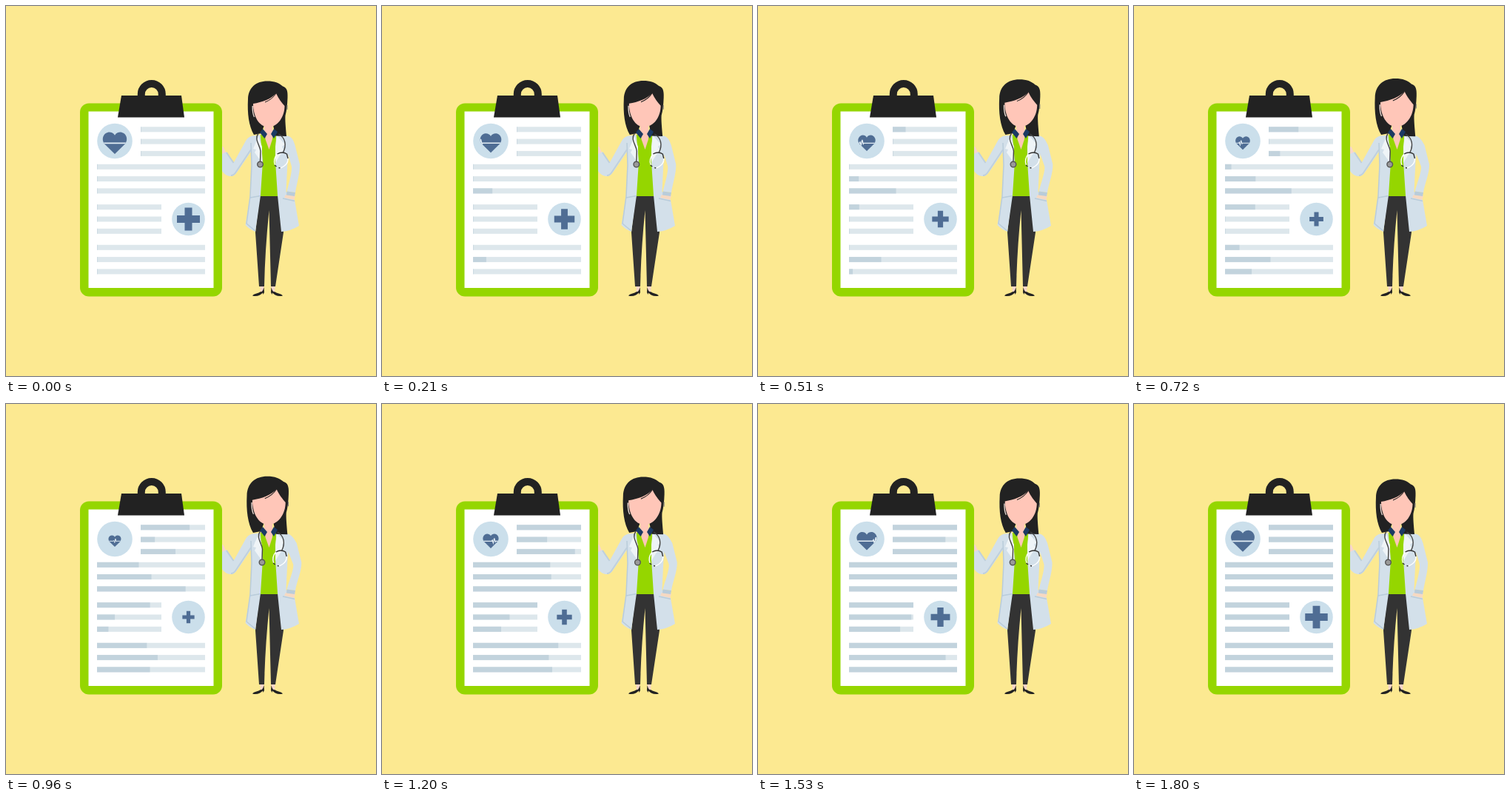
Animation of 500x500 px, one loop 1.83 s. Source, as an HTML page:

```html
<!DOCTYPE html>
<html lang="en">
<head>
<meta charset="utf-8">
<title>Medical checklist</title>
<style>
html, body { margin: 0; width: 100%; height: 100%; overflow: hidden; background: #fce991; }
svg { display: block; width: 100vw; height: 100vh; }
</style>
</head>
<body>
<svg viewBox="0 0 500 500">
  <defs>
    <path id="heartShape" d="M0-10.6C-2.6-15.4-8.6-15.9-12.2-13.3C-16.8-10-17.6-3.6-13.8 1.2L0 14.7L13.8 1.2C17.6-3.6 16.8-10 12.2-13.3C8.6-15.9 2.6-15.4 0-10.6Z"/>
    <clipPath id="heartClip"><use href="#heartShape"/></clipPath>
    <path id="shoe" d="M333 391.5C336 388 341 388.5 344 386C346 387 347.5 384 348.5 380L349 387L347.5 390L347 387.5C344 391 339 393 333 391.5Z"/>
  </defs>

  <!-- legs -->
  <path fill="#f7d5c9" d="M343.5 378H348.5L348 388H344ZM358.5 378H363.5L363 388H359Z"/>
  <g fill="#222">
    <use href="#shoe"/>
    <use href="#shoe" transform="translate(707 0) scale(-1 1)"/>
  </g>
  <path fill="#333" d="M343 254H368L375 306L364 379H358L355.5 276Q350 330 349 379H342L337 306Z"/>

  <!-- raised arm -->
  <path fill="#f8d5ce" d="M290 188L294 191L297.5 199L290 202Z"/>
  <path fill="#d3e0ea" d="M338 175C330 175 326 178 323 184L307.5 212L298 197L290 201V220C295 228 299 230 304 230C309 230 311 226 314 222L333 194Z"/>
  <path fill="none" stroke="#bfd0dd" stroke-width="2" d="M331 194L311 224Q308 229 304 229M298 198L307.5 212"/>

  <!-- torso -->
  <path fill="#95d600" d="M344 174H367L368 257H344Z"/>
  <path id="sleeve" fill="#d3e0ea"/>
  <path fill="#d3e0ea" d="M343 174L334 176L330 183L332 215L330 257L323.5 296Q329 302 337 305L344 256L347 210L344 178ZM365 175L378 175L384 181L380.5 210L378.500 251L390 262L396 297Q385 304 372 305L367 256L364 210Z"/>
  <path fill="#f6d9c2" d="M378 255L391 256L389.500 262L376 259Z"/>
  <path fill="#b9ccda" d="M379.5 250.5L391 252L390 257L379 255.5Z"/>
  <path fill="none" stroke="#b9ccda" stroke-width="1.5" d="M331 185L332 215L330 257L325 294L337 304M330 259L344 256.5M374 260L390 263.5"/>
  <path fill="#eff4f7" d="M341 176L334 193L338 194L336 198L346 212V190ZM366 175L377 187L373 190L375 194L364 212V190Z"/>
  <path fill="#ffc6b8" d="M350 168H361L360 180L355.500 194L350.500 180Z"/>

  <!-- head -->
  <g id="head">
    <path fill="#222" d="M353 101.500C338 101.500 327.500 110 327 126C326 145 328 162 335 174L345 172L349 161H361L364 175.500L379 176C378 164 377 154 377.500 148Q380 139 380.500 124C381 114 379 110 374 108.500C369 104 363 101.500 353 101.500Z"/>
    <path fill="#ffc6b8" d="M334 132C346 130 358 126 365 118C368 125 373 131 376.500 135C376.500 150 367 163.500 354.500 163.500C342 163.500 334 149 334 132Z"/>
    <path fill="none" stroke="#222" d="M365 118Q360 126 350 130"/>
    <path fill="none" stroke="#f1dfd7" stroke-width="1.3" d="M333.2 135Q333 145 335.5 150"/>
    <path fill="none" stroke="#777" d="M380 134V140"/>
  </g>
  <path fill="#ffc6b8" d="M349 158H360V169H349Z"/>
  <path fill="#1c3a63" d="M347 166L353 173L349.5 179L343 171ZM362 166L367 170L362 179L358 173Z"/>

  <!-- stethoscope -->
  <g fill="none" stroke-width="1.4">
    <g id="chestPiece">
      <path stroke="#444" d="M341 172C335 181 343 187 344 196L343.5 210"/>
      <circle cx="343.5" cy="214" r="3.8" fill="#999" stroke="#555"/>
    </g>
    <g id="earPieces">
      <path stroke="#444" d="M369 173C378 178 380 188 375 198"/>
      <path stroke="#fff" d="M367 200Q361 207 364 215M381 203Q384 214 371 219"/>
      <path stroke="#333" d="M367 200Q374 196 380 200L381.5 206M363.500 215L366 217M369 218.5L371 219"/>
    </g>
  </g>

  <!-- clipboard -->
  <rect x="100" y="131.5" width="192" height="261" rx="12" fill="#95d600"/>
  <rect x="111.5" y="142.5" width="169" height="238.5" fill="#fff"/>
  <path fill="none" stroke="#222" stroke-width="10" d="M182.8 124V119A14 14 0 0 1 210.8 119V124"/>
  <path fill="#222" d="M156 121H237L241 150.500H151Z"/>
  <g id="bars"></g>

  <circle cx="147" cy="182.5" r="23.8" fill="#cbdfeb"/>
  <g id="heart">
    <use href="#heartShape" fill="#4f6d94"/>
    <g clip-path="url(#heartClip)">
      <path id="pulse" fill="none" stroke="#e4eef5" stroke-width="1.8"/>
    </g>
  </g>
  <circle cx="246.5" cy="288" r="22.3" fill="#cbdfeb"/>
  <path id="plus" fill="#4f6d94" d="M-5-15.5H5V-5H15.5V5H5V15.5H-5V5H-15.5V-5H-5Z"/>
</svg>
<script>
const LOOP = 1830, STEP = 30, ROW_GAP = 16.3;
const $ = id => document.getElementById(id);
const clamp = v => Math.min(1, Math.max(0, v));

// Three rows per paragraph; each row fills during its own part of the loop.
const paragraphs = [
  { x: 182, y: 163.3, width: 87, fills: ["19-63%", "41-93%", "33-69%"] },
  { x: 123, y: 213.8, width: 146, fills: ["37-77%", "22.5-82%", "0-64%"] },
  { x: 123, y: 268.2, width: 87, fills: ["22-59%", "40-85%", "43.5-94%"] },
  { x: 123, y: 322.8, width: 146, fills: ["34-74%", "0-93.5%", "26-80%"] }
];

const bars = paragraphs.flatMap(({ x, y, width, fills }) =>
  fills.map((span, row) => {
    const [start, end] = span.split("-").map(part => parseFloat(part) / 100);
    const top = y + row * ROW_GAP;
    addRect(x, top, width, "#dde7ec");
    return { fill: addRect(x, top, 0, "#c2d3dd"), width, start, end };
  }));

function addRect(x, y, width, fill) {
  const rect = document.createElementNS("http://www.w3.org/2000/svg", "rect");
  const attrs = { x, y, width, height: 7, fill };
  for (const key in attrs) rect.setAttribute(key, attrs[key]);
  return $("bars").appendChild(rect);
}

const move = (id, value) => $(id).setAttribute("transform", value);

function draw(phase) {
  const sway = (1 - Math.cos(2 * Math.PI * phase)) / 2;
  const size = 0.5 + Math.abs(phase - 0.5);

  for (const { fill, width, start, end } of bars) {
    const part = clamp((phase - start) / (end - start));
    fill.setAttribute("width", Math.max(0.6, part * width));
  }

  move("heart", `translate(147 185.3) scale(${size})`);
  move("plus", `translate(246.5 288) scale(${size})`);
  const x = 42 * (phase - 0.5);
  $("pulse").setAttribute("d", `M-40 0H${x - 4.5}l1.2-2l1.8 6l2.2-10l2 7.5l1-1.5H40`);

  move("head", `translate(354 172) scale(${1 + 0.055 * sway}) translate(-354 -172)`);
  move("chestPiece", `translate(${2.5 * sway} 0)`);
  move("earPieces", `translate(${-0.5 - 1.8 * sway} 0)`);

  const elbow = 397 + 2.3 * sway;
  $("sleeve").setAttribute("d",
    `M378 175C386 176 388 180 ${elbow - 6.5} 188L${elbow} 214` +
    `C${elbow + 0.5} 225 393 240 391 252L379.5 250.5` +
    `C383 238 ${elbow - 10.5} 224 ${elbow - 11} 217L380 196Z`);
}

const origin = performance.now();
function tick() {
  const t = (performance.now() - origin) % LOOP;
  draw(Math.floor(t / STEP) * STEP / LOOP);
  requestAnimationFrame(tick);
}
tick();
</script>
</body>
</html>
```
